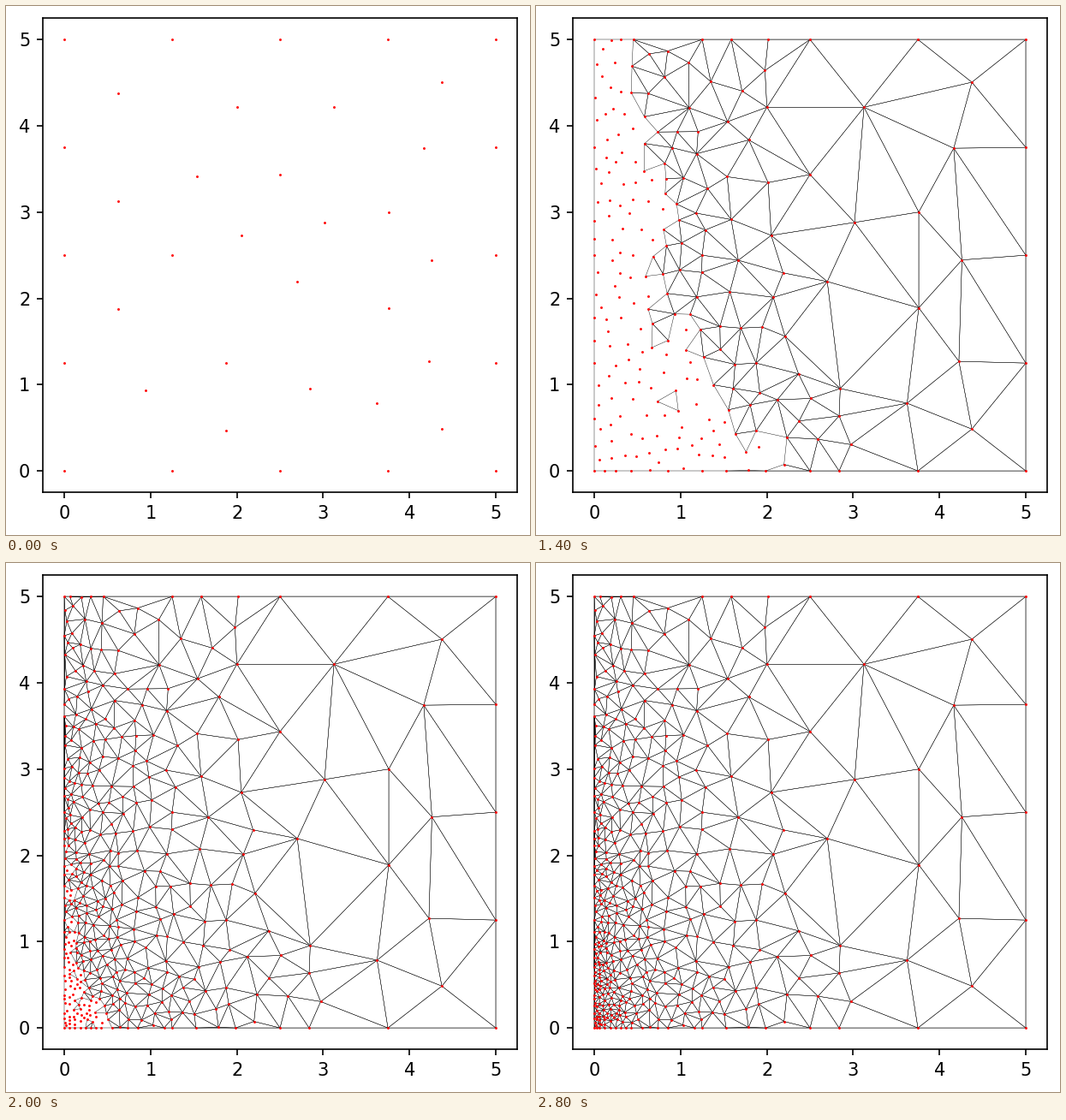
Write a matplotlib script that moves like this. It is 612x618 px and loops after 3.8 s.

```python
import matplotlib.pyplot as plt
import numpy as np
from matplotlib.animation import FuncAnimation
from matplotlib.collections import PolyCollection
from matplotlib.tri import Triangulation

WIDTH, HEIGHT, DPI = 612, 618, 150
SIDE = 5.0
FRAME_MS, FRAMES, HOLD = 200, 19, 4
DARTS = 4000

# Interior nodes of the starting mesh.
COARSE = [
    (.625, 4.375), (2, 4.215), (3.125, 4.215), (4.375, 4.505), (4.165, 3.74),
    (1.54, 3.41), (2.5, 3.435), (.625, 3.125), (3.016, 2.88), (3.76, 3),
    (2.05, 2.73), (1.25, 2.5), (4.26, 2.445), (2.7, 2.195), (.625, 1.875),
    (3.76, 1.89), (1.875, 1.25), (.945, .93), (2.85, .955), (3.625, .785),
    (4.225, 1.27), (1.875, .465), (4.375, .485),
]
# Smallest node spacing at each refinement stage, the last one unlimited.
SPACING = [.55, .224, .154, .1, .064, .049, .038, .032, 0]
LAST_STAGE = len(SPACING) + 1


def size_field(x, y):
    """Wanted node spacing: finest in the lower left corner."""
    return .028 + .077 * x + .015 * y + .026 * x * y


def border_nodes():
    ticks = np.linspace(0, SIDE, 5)
    return [(x, y) for x in ticks for y in ticks
            if x in (0, SIDE) or y in (0, SIDE)]


def delaunay(nodes):
    return Triangulation(nodes[:, 0], nodes[:, 1]).triangles


def settled_circles(nodes):
    """Circumcircles of the coarse triangles that need no refinement."""
    corners = nodes[delaunay(nodes)]
    x, y = corners.mean(axis=1).T
    edges = corners[:, 1:] - corners[:, :1]
    settled = x > 2.53 + 2.15 * np.maximum(0, 1 - y)
    settled &= np.abs(np.linalg.det(edges)) > 1e-6
    edges, origin = edges[settled], corners[settled, 0]
    to_center = np.linalg.solve(2 * edges, (edges ** 2).sum(axis=2)[..., None])[..., 0]
    return origin + to_center, (to_center ** 2).sum(axis=1)


def throw_dart(rng):
    """Pick a random position, denser to the lower left, sometimes on a border."""
    x, y = 3 * rng.random() ** 2.2, SIDE * rng.random() ** 1.4
    pick = rng.random()
    if pick < .08:
        y = 0.0
    elif pick < .13:
        y = SIDE
    elif pick < .15:
        x = 0.0
    return x, y


def build_nodes():
    """Return node positions and the stage at which each one is inserted."""
    rng = np.random.default_rng(12)
    start = np.array(border_nodes() + COARSE)
    centers, radii_squared = settled_circles(start)

    count = len(start)
    nodes = np.empty((count + DARTS * len(SPACING), 2))
    nodes[:count] = start
    stages = [0] * count
    previous = np.inf
    for stage, spacing in enumerate(SPACING, 1):
        for _ in range(DARTS):
            x, y = throw_dart(rng)
            size = size_field(x, y)
            if size > previous:
                continue
            if (((centers - (x, y)) ** 2).sum(axis=1) < radii_squared).any():
                continue
            # Near the left border nodes lie further apart vertically.
            stretch = 1 - .08 * y * np.exp(-2 * x)
            offset = (nodes[:count] - (x, y)) * (1 / stretch, stretch)
            gap = max(spacing, size) * rng.uniform(.7, 1.6)
            if (offset ** 2).sum(axis=1).min() > gap ** 2:
                nodes[count] = x, y
                stages.append(stage)
                count += 1
        previous = spacing
    return nodes[:count], np.array(stages)


nodes, node_stage = build_nodes()
triangles = delaunay(nodes)
triangle_stage = node_stage[triangles].max(axis=1)
outline = np.array([(0, 0), (SIDE, 0), (SIDE, SIDE), (0, SIDE)])

fig = plt.figure(figsize=(WIDTH / DPI, HEIGHT / DPI), dpi=DPI, facecolor="white")
box = 554.4
ax = fig.add_axes([42.85 / WIDTH, 49.65 / HEIGHT, box / WIDTH, box / HEIGHT])
ax.set(xlim=(-.25, 5.25), ylim=(-.25, 5.25), xticks=range(6), yticks=range(6))
ax.tick_params(labelsize=10, labelfontfamily="DejaVu Sans")

mesh = PolyCollection([], facecolors="none", edgecolors="black", linewidths=.2)
ax.add_collection(mesh, autolim=False)
dots, = ax.plot([], [], "o", color="red", markersize=1.4, markeredgewidth=0)


def draw(frame):
    stage = min(max(frame - HOLD, 0), LAST_STAGE)
    shown = nodes[node_stage <= stage]
    # A triangle is drawn once it has survived a whole stage.
    polygons = list(nodes[triangles[triangle_stage < stage]])
    if stage > 0:
        polygons.append(outline)
    mesh.set_verts(polygons)
    dots.set_data(shown[:, 0], shown[:, 1])
    return mesh, dots


anim = FuncAnimation(fig, draw, frames=FRAMES, interval=FRAME_MS,
                     repeat=True, repeat_delay=0)
plt.show()
```
